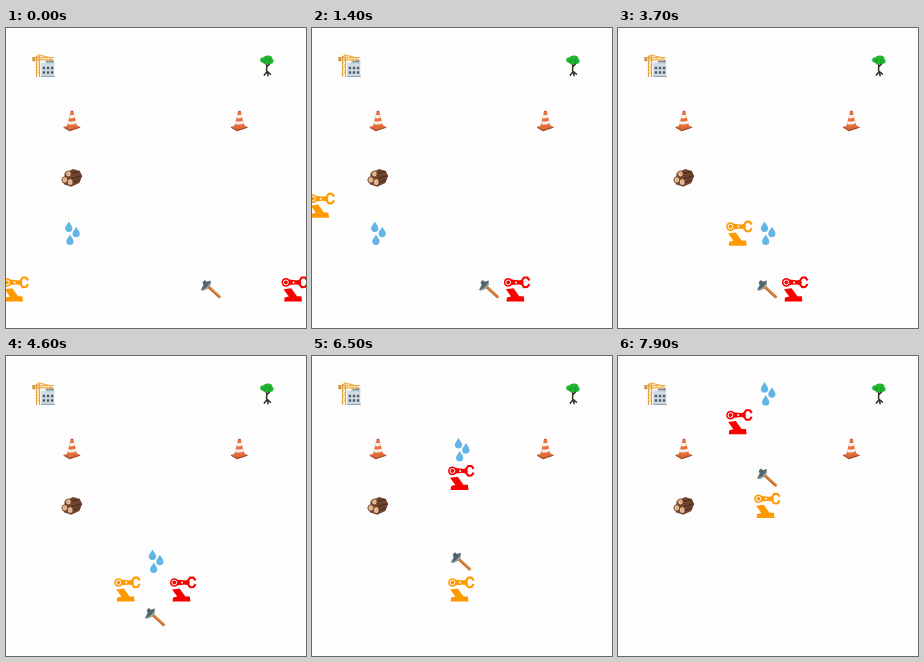
These frames come from a looping animation (300x300 px, 8000 ms). An HTML page:

```html
<!DOCTYPE html>
<html lang="en">
<head>
<meta charset="utf-8">
<title>Robots on a grid</title>
<style>
  html, body { margin: 0; width: 100%; height: 100%; overflow: hidden; background: #fdfdfd; }
  svg { display: block; width: 300px; height: 300px; }
</style>
</head>
<body>
<svg viewBox="0 0 300 300">
  <defs>
    <!-- Every symbol is drawn around the centre of its cell. -->
    <g id="robot">
      <path d="M-11.2 .4L-3.6-.6L2.2 7.4H6.6L7.2 12.6H-10.6L-10.2 8.6L-6 7.6Z"/>
      <path d="M-6-9.3L3.2-8.4V-4.6L-6-3.8Z"/>
      <circle cx="-8.9" cy="-6.5" r="4.3"/>
      <circle cx="-8.9" cy="-6.5" r="2.4" fill="none" stroke="#fdfdfd" stroke-width="1"/>
      <circle cx="-1.2" cy="-6.5" r="1" fill="#fdfdfd"/>
      <circle cx="4" cy="-6.5" r="2.5"/>
      <path d="M4.2-7.4L6.9-11.4L10.2-11.4L12.4-8.6M4.2-5.6L6.9-1.8L10.2-2L12.4-4.8"
            fill="none" stroke="currentColor" stroke-width="2.1" stroke-linejoin="round"/>
    </g>

    <g id="site">
      <path d="M-2.6-3.2H10.6V11H-2.6Z" fill="#d3dde3"/>
      <path d="M1.6-5.6H10.6V-2H1.6Z" fill="#c3d0d8"/>
      <path d="M3-4.2H9.6" stroke="#5f7482" stroke-width="1.6" stroke-dasharray="1.7 .6"/>
      <path d="M-1 2.4H10M-1 6.8H10" stroke="#4b5b69" stroke-width="2.5" stroke-dasharray="2.4 1.7"/>
      <path d="M-2.6 10.6H11" stroke="#8798a3"/>
      <path d="M-11.4-8.2H10.4M-10.6-5.8H9.6M-8-6L-5-10.8L8-7.6" fill="none" stroke="#efb04a" stroke-width="1.2"/>
      <path d="M-7.2-10V11.4M-4.2-10V11.4" stroke="#e6a43c" stroke-width="1.2"/>
      <path d="M-7 9L-4.4 6L-7 3L-4.4 0L-7-3L-4.4-6M-10-8L-8-6L-4-8L-1-6L2-8L5-6L8-8"
            fill="none" stroke="#efb04a" stroke-width=".8"/>
      <path d="M-11.4-8.6H-8.6V-4.4H-11.4Z" fill="#c89a58"/>
      <path d="M8.6-6V-3.4" stroke="#8c8578" stroke-width=".8"/>
    </g>

    <g id="tree">
      <path d="M-.6-2C1 1-1.6 3 .2 6L-2.6 9.4M.2 5.6L1.2 10M.2 5.6L3.6 8.6M0 1L2.8-2"
            fill="none" stroke="#3a2a26" stroke-width="1.5" stroke-linecap="round"/>
      <g fill="#22b533">
        <ellipse cx="-3" cy="-5.6" rx="3.8" ry="2.8"/>
        <ellipse cx="1" cy="-7.6" rx="4.4" ry="2.6"/>
        <ellipse cx="3.4" cy="-4.6" rx="3.3" ry="2.8"/>
        <ellipse cx="-.4" cy="-3.2" rx="3.2" ry="2"/>
      </g>
      <path d="M-4-4.4L-1-5M1-6L4-5.6M1-3L3-3.2" stroke="#118a24" stroke-width=".9"/>
    </g>

    <g id="cone">
      <path d="M-8 5.2L3.2 2.6L8.6 5.8L-2 9.4Z" fill="#dd6839"/>
      <path d="M-8 5.2L-2 8.4L8.6 5.2V6.2L-2 9.8L-8 6.2Z" fill="#9d4527"/>
      <path d="M-.8-10.4H1.6L5.4 4.6Q1 7.8-4.8 5.2Z" fill="#e66f3c"/>
      <path d="M-1.7-6.8Q.4-6 2.5-7L3.3-3.9Q.4-2.4-2.5-3.6ZM-3.3-.6Q.4 .8 4.1-.9L4.8 2Q.4 4-4 2.4Z" fill="#f5eeea"/>
      <path d="M-.8-10.2H1.6" stroke="#a94c2c" stroke-width=".9"/>
    </g>

    <g id="logs">
      <path d="M-7-4.2L1.6-8.2L8.2-6.4L10.6-1.2L7.8 5.8L-.4 9.4L-8 7Z" fill="#70452f"/>
      <path d="M-2-3.4L8-6M0 1.4L10-1.4M0 5.6L8.4 2.4" stroke="#4e2f22" stroke-width="1.2"/>
      <g fill="#e7bd98" stroke="#6c4029" stroke-width=".9">
        <ellipse cx="-3.2" cy="-3.4" rx="2.8" ry="3"/>
        <ellipse cx="-6.8" cy="2.6" rx="2.9" ry="3.1"/>
        <ellipse cx="-1.4" cy="4.8" rx="2.9" ry="3.4"/>
      </g>
      <path d="M-3.8-3.4H-2.6M-7.4 2.6H-6.2M-2 4.8H-.8" stroke="#bd8660"/>
    </g>

    <g id="axe">
      <path d="M-6.6-5.8L8.4 8" stroke="#d8843c" stroke-width="2.8" stroke-linecap="round"/>
      <path d="M-5-3.2L7.8 8.6" stroke="#a85f2b" stroke-width=".8"/>
      <path d="M-8.6-6.6L-6.4-8.8L-4.4-7.2L-.6-8.4Q.6-4.4-3.2-.6Q-6.8 2.4-10.2 1.2L-7.6-3.8Z" fill="#55646b"/>
      <path d="M-10.2 1.2Q-6.8 2.4-3.2-.6Q.6-4.4-.6-8.4Q-1.4-4.6-4-2.2Q-6.8 .4-10.2 1.2Z" fill="#98a6ac"/>
    </g>

    <path id="drop" d="M.2-5.2C1.4-2.8 3.8-.6 3.8 1.6A3.6 3.6 0 0 1-3.5 1.6C-3.5-.6-.8-2.6 .2-5.2Z"/>
    <g id="water" fill="#62b5e5">
      <use href="#drop" x="-3" y="-6.4"/>
      <use href="#drop" x="4.4" y="-1.2"/>
      <use href="#drop" x="-1.8" y="6.6"/>
    </g>
  </defs>
  <g id="stage"></g>
</svg>
<script>
  const LOOP = 8000, PITCH = 27.9, ORIGIN = 9.8;
  const DIRS = { U: [0, -1], D: [0, 1], L: [-1, 0], R: [1, 0], '.': [0, 0] };

  // One letter per tick: the direction of a one-cell move, or a dot for rest.
  const pieces = [
    { icon: 'site', col: 1, row: 1 },
    { icon: 'tree', col: 9, row: 1 },
    { icon: 'cone', col: 2, row: 3 },
    { icon: 'cone', col: 8, row: 3 },
    { icon: 'logs', col: 2, row: 5 },
    { icon: 'water', col: 2, row: 7, path: '.....RRR..UUUUUU.' },
    { icon: 'axe', col: 7, row: 9, path: '..LL........UUUUU' },
    { icon: 'robot', col: 0, row: 9, color: '#ff9900', path: 'UUUDRRRRDDDRUUUUU' },
    { icon: 'robot', col: 10, row: 9, color: '#f80000', path: 'LLLL....ULUUUUUUL' }
  ];

  const stage = document.getElementById('stage');
  const place = n => ORIGIN + n * PITCH;

  for (const piece of pieces) {
    piece.el = document.createElementNS('http://www.w3.org/2000/svg', 'use');
    piece.el.setAttribute('href', '#' + piece.icon);
    if (piece.color) {
      piece.el.setAttribute('fill', piece.color);
      piece.el.setAttribute('color', piece.color);
    }
    stage.append(piece.el);
  }

  // Ticks are 1400/3 ms apart, shown on the nearest tenth of a second.
  const tickTime = n => Math.round(n * 14 / 3) * 100;

  function draw(time) {
    let ticks = 0;
    while (tickTime(ticks + 1) <= time) ticks++;
    for (const { el, col, row, path = '' } of pieces) {
      let x = col, y = row;
      for (const step of path.slice(0, ticks)) {
        x += DIRS[step][0];
        y += DIRS[step][1];
      }
      el.setAttribute('transform', `translate(${place(x)} ${place(y)})`);
    }
  }

  const start = performance.now();
  function frame() {
    draw((performance.now() - start) % LOOP);
    requestAnimationFrame(frame);
  }
  frame();
</script>
</body>
</html>
```
